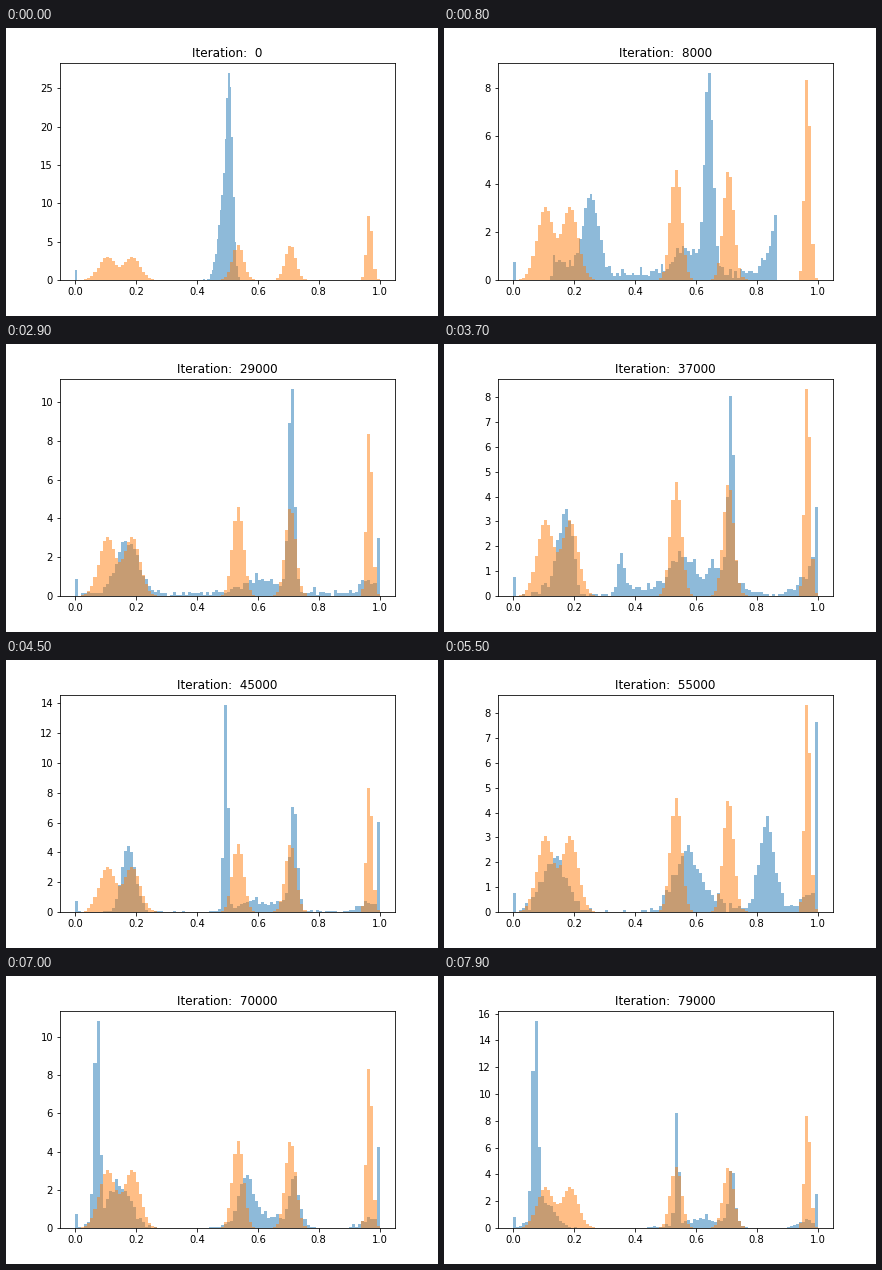
A matplotlib script that plays this animation: 432 px wide and 288 px high, repeating every 8 s.

```python
from math import erf

import numpy as np
import matplotlib.pyplot as plt
from matplotlib.animation import FuncAnimation

FRAMES = 80
BINS = 100
EDGES = np.linspace(0, 1, BINS + 1)
U = np.linspace(0, 1, 4001)

# Real data: equal clusters (mean, spread)
CLUSTERS = [(.1045, .0262), (.1875, .0262), (.535, .0172),
            (.7085, .0172), (.9678, .00865)]

# Bumps shared by all trained generators: (position, spread, height)
COMMON = [(.62, .07, .7), (.97, .03, .6)]

# Training stages: (iteration / 1000, density in the last bin, floor, own bumps)
STAGES = [
    (16, 2.8, .2, [(.02, .03, .6), (.16, .032, 2.5), (.699, .0155, 6.4)]),
    (29, 2.5, .15, [(.173, .034, 2.8), (.7117, .0094, 10.9)]),
    (45, 5.6, .03, [(.175, .022, 4.5), (.4966, .0069, 14.1),
                    (.719, .0115, 7.2)]),
    (55, 7.3, .03, [(.135, .04, 2.2), (.565, .038, 2), (.834, .026, 3.5)]),
    (70, 3.9, 0, [(.0715, .0083, 11.25), (.143, .04, 2.3),
                  (.56, .022, 2.5), (.721, .015, 2.7)]),
    (79, 2.3, 0, [(.0719, .0083, 15), (.1, .035, 1.9),
                  (.5374, .0057, 9), (.72, .01, 4.4)]),
]


def quantiles(bumps, top=1, first=.75, last=0, floor=0):
    """Inverse CDF on U and total mass of a sum of bumps on [0, top]."""
    edges = EDGES * top
    x = (edges[1:] + edges[:-1]) / 2
    h = sum(a * np.exp(-((x - m) / s) ** 2 / 2) for m, s, a in bumps)
    h += floor + 1e-6
    h[0] += first
    h[-1] += last
    cdf = np.concatenate([[0], np.cumsum(h)])
    return np.interp(U, cdf / cdf[-1], edges), cdf[-1] * top / BINS


untrained = [(.487, .0178, 10), (.5076, .0103, 21.7)]
times = [0] + [s[0] for s in STAGES]
curves = [quantiles(untrained, top=.54, first=1.4)] + [
    quantiles(COMMON + bumps, last=last, floor=floor)
    for _, last, floor, bumps in STAGES]


def generated(n):
    """Histogram of the generator output after n thousand iterations."""
    k = min(np.searchsorted(times, n, side="right"), len(times) - 1) - 1
    t = (n - times[k]) / (times[k + 1] - times[k])
    if k == 0:
        t = np.sqrt(t)  # fast start of the training
    (qa, ma), (qb, mb) = curves[k:k + 2]
    q = (1 - t) * qa + t * qb
    edges = EDGES * q[-1]
    mass = np.diff(np.interp(edges, q, U)) * ((1 - t) * ma + t * mb)
    h = mass * BINS / q[-1]
    # sampling noise, mostly visible on the low bars
    rng = np.random.default_rng(100 + n)
    h[1:] += (.2 * np.sqrt(h) * np.exp(-h / 3) * rng.standard_normal(BINS))[1:]
    grain = .075
    return np.where(h < 3, np.round(np.maximum(h, 0) / grain) * grain, h), edges


def real_density():
    cdf = sum(np.array([erf((e - m) / (s * 2 ** .5)) for e in EDGES])
              for m, s in CLUSTERS) / (2 * len(CLUSTERS))
    return np.diff(cdf) * BINS


plt.rcParams.update({"font.family": "DejaVu Sans", "font.size": 10,
                     "figure.subplot.bottom": .125})
fig, ax = plt.subplots(figsize=(6, 4), dpi=72)
real = real_density()
fake_bars = ax.stairs(*generated(0), fill=True, color="C0", alpha=.5)
ax.stairs(real, EDGES, fill=True, color="C1", alpha=.5)
ax.set_xlim(-.05, 1.05)
title = ax.set_title("")


def update(n):
    h, edges = generated(n)
    fake_bars.set_data(h, edges)
    ax.set_ylim(0, 1.05 * max(h.max(), real.max()))
    title.set_text(f"Iteration:  {n * 1000}")
    return fake_bars, title


anim = FuncAnimation(fig, update, frames=FRAMES, interval=100,
                     init_func=lambda: update(0), repeat=True, repeat_delay=0)
plt.show()
```
